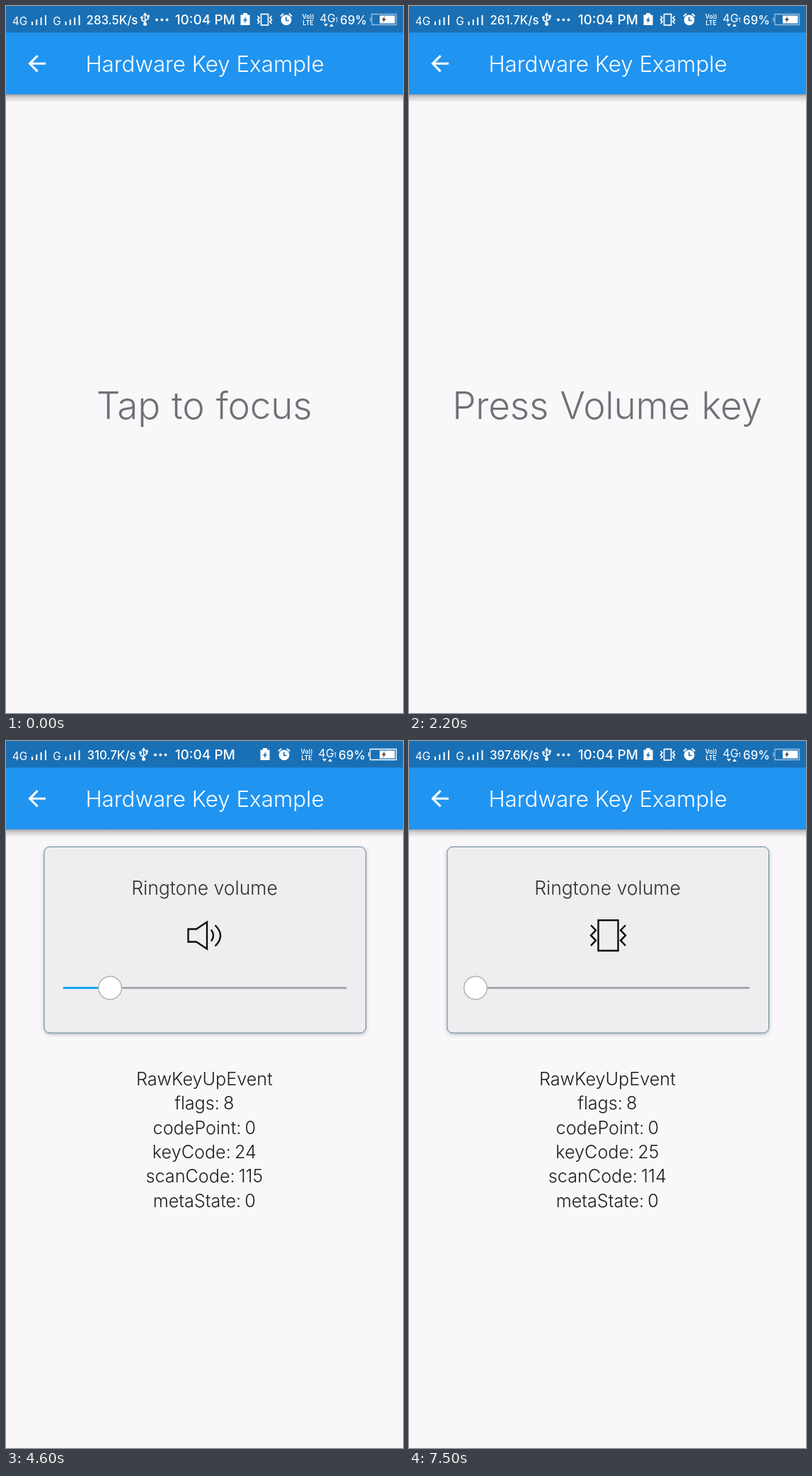
These frames come from a looping animation (561x998 px, 7.6 s). An HTML page:

```html
<!DOCTYPE html>
<html lang="en">
<head>
<meta charset="utf-8">
<title>Hardware key demo</title>
<style>
  html, body { margin: 0; width: 100%; height: 100%; overflow: hidden; background: #f9f7fa; }
  svg { display: block; width: 100vw; height: 100vh; }
  text { font-family: Inter, Roboto, sans-serif; font-weight: 300; text-anchor: middle; }
  .status text { font-weight: 400; fill: #fff; }
  .status .strong { font-weight: 500; }
  .line { fill: none; stroke: #fff; }
  .icon { fill: none; stroke: #0c0b0d; stroke-width: 2.4; }
  #prompt { word-spacing: 1.5px; letter-spacing: -.2px; }
  #event { word-spacing: -2px; }
</style>
</head>
<body>
<svg viewBox="0 0 561 998" preserveAspectRatio="none">
  <defs>
    <linearGradient id="barShadow" x2="0" y2="1">
      <stop offset="0" stop-color="#000" stop-opacity=".38"/>
      <stop offset=".35" stop-color="#000" stop-opacity=".17"/>
      <stop offset="1" stop-color="#000" stop-opacity="0"/>
    </linearGradient>
    <filter id="cardShadow" x="-5%" y="-5%" width="110%" height="112%">
      <feDropShadow dx="0" dy="1.5" stdDeviation="2.5" flood-color="#3c4a55" flood-opacity=".4"/>
    </filter>
    <path id="bolt" d="M1.4 -5L-3 .9H-.4L-1.4 5L3 -.9H.4Z"/>
    <path id="bars" class="line" stroke-width="2" d="M1 27v-5M7.3 27v-8M13.6 27v-11M20 27v-14"/>
  </defs>

  <rect width="561" height="998" fill="#f9f7fa"/>
  <rect y="124" width="561" height="12" fill="url(#barShadow)"/>
  <rect y="37" width="561" height="87.7" fill="#2094f1"/>
  <rect width="561" height="37.5" fill="#1a70b5"/>

  <g class="status">
    <text x="19.5" y="27" font-size="15.5">4G</text>
    <use href="#bars" x="36"/>
    <text x="72" y="27" font-size="15.5">G</text>
    <use href="#bars" x="83.5"/>
    <text id="speed" class="strong" y="25.7" font-size="16.8"></text>
    <g id="usb">
      <path class="line" stroke-width="1.6" d="M196.5 13V25M196.5 23L192 20V17M196.5 21L201 18V15"/>
      <path fill="#fff" d="M196.5 9l3 4.500h-6zM190.300 14.500h3.400v3.400h-3.400zM199.300 12.800h3.400v3.400h-3.400z"/>
      <circle cx="196.5" cy="25.500" r="2.500" fill="#fff"/>
      <g fill="#fff"><circle cx="213" cy="19.500" r="1.900"/><circle cx="220.300" cy="19.500" r="1.900"/><circle cx="227.500" cy="19.500" r="1.900"/></g>
    </g>
    <text class="strong" x="281.300" y="26" font-size="19">10:04 PM</text>

    <g id="charge">
      <path fill="#fff" d="M331.500 12.500h3.500v-2.500h6v2.500h3.500v14.500h-13z"/>
      <use href="#bolt" x="338" y="19.800" fill="#1a70b5"/>
    </g>
    <g id="buzz" class="line" stroke-width="1.700">
      <rect x="360.500" y="11.500" width="10" height="15.500"/>
      <path d="M355.500 14l2.500 2.700l-2.500 2.700l2.500 2.700l-2.500 2.700M375.500 14l-2.500 2.700l2.500 2.700l-2.500 2.700l2.500 2.700"/>
    </g>
    <g id="alarm">
      <circle cx="396" cy="19.800" r="7.400" fill="#fff"/>
      <path class="line" stroke-width="2" d="M388 14.500l4-3.700M404 14.500l-4-3.700"/>
      <path fill="none" stroke="#1a70b5" stroke-width="1.700" d="M395.800 15.500v5h4"/>
    </g>
    <g id="network">
      <text x="427" y="17.500" font-size="8.500" style="font-weight:600">Vo))</text>
      <text x="427" y="27" font-size="9" style="font-weight:600">LTE</text>
      <text x="454.500" y="23" font-size="16">4G</text>
      <text x="467" y="23" font-size="9">1</text>
      <path fill="#fff" d="M449 25h6l-3 4zM457 29h6l-3-4z"/>
      <text class="strong" x="491" y="25.500" font-size="16.800">69%</text>
    </g>
    <path id="cell" class="line" stroke-width="1.300"/>
    <path fill="#fff" d="M528 13.500h21.500v11h-21.500z"/>
    <use href="#bolt" x="534" y="19" fill="#51483f"/>
  </g>

  <path class="line" stroke-width="3.100" d="M56 81.300H34M44.600 70.200L33.500 81.300L44.600 92.400"/>
  <text x="281" y="92.700" font-size="31.300" fill="#fff" style="font-weight:350">Hardware Key Example</text>

  <text id="prompt" x="280" y="583" font-size="53" fill="#717074"></text>
  <g id="event" font-size="25.200" fill="#1e1d20"></g>

  <g id="card">
    <rect x="54" y="149.500" width="454.500" height="262.500" rx="8" fill="#efedf0" stroke="#66899a" filter="url(#cardShadow)"/>
    <text x="280.500" y="217" font-size="26.500" fill="#302f32" style="font-weight:350">Ringtone volume</text>
    <path id="speaker" class="icon" d="M257.500 265.500H269L284 255.500V293.500L269 283.500H257.500ZM290 266.500Q296 274.500 290 282.500M295.500 260Q310.500 274.500 295.500 289.500"/>
    <path id="vibrate" class="icon" d="M267.500 253h28v43h-28zM257 260l7 7.200l-7 7.200l7 7.200l-7 7.200M306 260l-7 7.200l7 7.200l-7 7.200l7 7.200"/>
    <g stroke-width="3" stroke-linecap="round">
      <path d="M82 348.500H480" stroke="#a9a8ac"/>
      <path id="level" stroke="#12a5f5"/>
    </g>
    <circle id="thumb" cy="348.500" r="16.300" fill="#fff" stroke="#b0afb3" stroke-width="1.400"/>
  </g>
</svg>
<script>
const LOOP = 7600;
const el = id => document.getElementById(id);
const show = (id, on) => el(id).setAttribute('display', on ? 'inline' : 'none');
const shift = (id, dx) => el(id).setAttribute('transform', `translate(${dx} 0)`);
const write = (node, text) => { if (node.textContent !== text) node.textContent = text; };

const eventLines = Array.from({ length: 6 }, (_, i) => {
  const line = document.createElementNS('http://www.w3.org/2000/svg', 'text');
  line.setAttribute('x', 280.3);
  line.setAttribute('y', 486 + i * 34.3);
  return el('event').appendChild(line);
});

// Latest [start, value] entry reached at time t
const at = (steps, t) => steps.filter(([start]) => t >= start).pop()[1];

const speeds = [[0, '283.5'], [1300, '261.7'], [4300, '310.7'], [7300, '397.6']];
const prompts = [[0, 'Tap to focus'], [500, 'Press Volume key'], [2900, '']];
const keys = [
  [0, null],
  [2900, ['Down', 24, 115]],
  [3000, ['Up', 24, 115]],
  [6000, ['Down', 25, 114]],
  [7000, ['Up', 25, 114]]
];

function drawStatus(t, ringing) {
  const narrow = t >= 1300;
  write(el('speed'), at(speeds, t) + 'K/s');
  el('speed').setAttribute('x', narrow ? 149 : 150);
  shift('usb', narrow ? -2 : 0);
  show('buzz', !ringing);
  shift('charge', ringing ? 28 : 0);
  shift('alarm', ringing ? -3 : 0);
  shift('network', ringing ? -2 : 0);
  const left = ringing ? 514.5 : 517;
  el('cell').setAttribute('d', `M${left} 11.5H551.5V26.5H${left}ZM${left - 2} 16v6`);
  el('cell').setAttribute('stroke-opacity', ringing ? 1 : 0.55);
}

function drawEvent(key) {
  show('event', key);
  if (!key) return;
  const [action, code, scan] = key;
  [`RawKey${action}Event`, 'flags: 8', 'codePoint: 0', `keyCode: ${code}`,
    `scanCode: ${scan}`, 'metaState: 0'].forEach((text, i) => write(eventLines[i], text));
}

function drawCard(t, ringing) {
  const x = ringing ? 147 : 94;
  show('card', t >= 3100);
  show('speaker', ringing);
  show('vibrate', !ringing);
  el('level').setAttribute('d', `M82 348.5H${x}`);
  el('thumb').setAttribute('cx', x);
}

function render(t) {
  const ringing = t >= 2900 && t < 5900;
  drawStatus(t, ringing);
  write(el('prompt'), at(prompts, t));
  drawEvent(at(keys, t));
  drawCard(t, ringing);
}

const begin = performance.now();
function tick() {
  render((performance.now() - begin) % LOOP);
  requestAnimationFrame(tick);
}
tick();
</script>
</body>
</html>
```
